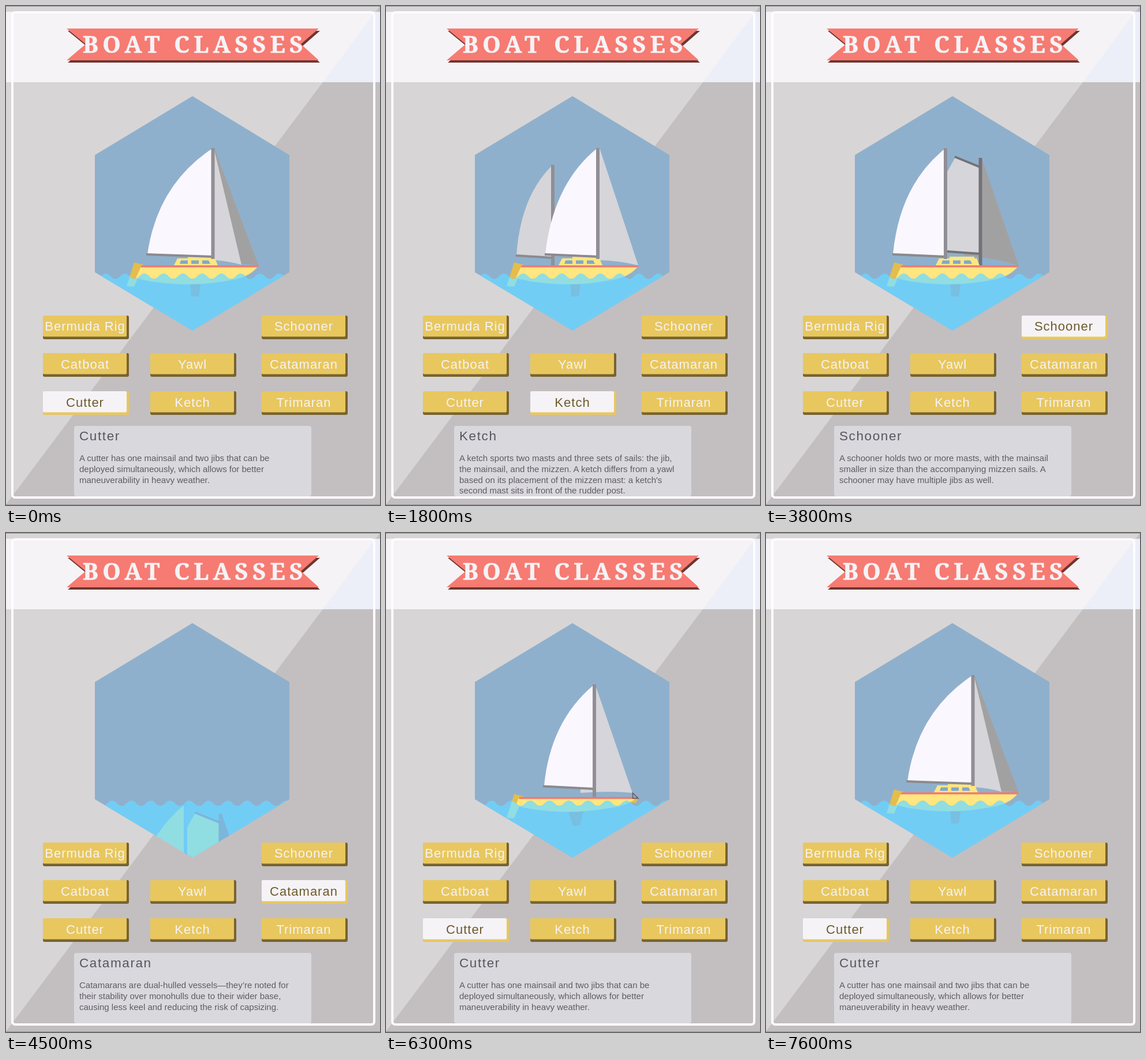
An HTML page for the animation above (7700 ms loop, 648x864 px).

```html
<!DOCTYPE html>
<html lang="en">
<head>
<meta charset="utf-8">
<title>Boat Classes</title>
<style>
  html, body { margin: 0; width: 100%; height: 100%; overflow: hidden; background: #c3bfc0; }
  svg { display: block; width: 648px; height: 864px; font-family: "Liberation Sans", Arial, sans-serif; }
  .title { font: 800 40px "Noto Serif", "Liberation Serif", serif; letter-spacing: 7.3px; fill: #f5f3f6; stroke: #f5f3f6; stroke-width: .7; }
  .btn .face { fill: #e8c75f; }
  .btn .edge { fill: #786330; }
  .btn text { fill: #f5f3f6; font-size: 22px; letter-spacing: 1px; text-anchor: middle; }
  .btn.on .face { fill: #f5f3f6; }
  .btn.on .edge { fill: #e8c75f; }
  .btn.on text { fill: #6e5a2b; }
  #head { font-size: 22.5px; letter-spacing: 1.6px; fill: #58555c; }
  #body { font-size: 15px; fill: #5f5c62; }

  .sail { fill: #fbf7fe; }
  .light { fill: #d6d5d9; }
  .dark { fill: #a2a1a2; }
  .mast { fill: #918f95; }
  .post { fill: #737278; }
  .boom { stroke: #8b8a90; stroke-width: 4; }
  .gaff { stroke: #737278; stroke-width: 4; }
  .hull { fill: #ffe680; }
  .stripe { fill: #ef7b70; }
  .gold { fill: #e3bd4e; }
  .glass { fill: #7fa9cc; }
  .keel { fill: #79bfe1; }
  .rail { fill: none; stroke: #5d5a60; stroke-width: 1.5; }
  /* the same parts seen through the water */
  .wet .sail, .wet .light, .wet .hull, .wet .gold { fill: #90dde2; }
  .wet .dark, .wet .post { fill: #7cb6da; }
  .wet .mast, .wet .glass { fill: #70cbf8; }
  .wet .stripe { fill: #86cfd8; }
  .wet .boom, .wet .gaff, .wet .rail { stroke: #7cb6da; }
</style>
</head>
<body>
<svg viewBox="0 0 648 864">
  <defs>
    <clipPath id="hex"><path d="M323 156L491 258V461L323 562L154 461V258Z"/></clipPath>
    <clipPath id="under"><path class="wave"/></clipPath>
  </defs>
  <rect width="648" height="864" fill="#c3bfc0"/>
  <path d="M0 0H648L0 863Z" fill="#d8d5d6"/>
  <rect y="10" width="648" height="122" fill="#eceef8"/>
  <path d="M0 10H640L549 132H0Z" fill="#f5f3f6"/>
  <path d="M0 .5H648M0 863.5H648" stroke="#92919a"/>

  <path id="ribbon" d="M105 39H542L511 66L542 94H105L138 66Z" fill="#6f3530" transform="translate(2 4)"/>
  <path d="M105 39H542L511 66L542 94H105L138 66Z" fill="#f67b72"/>
  <text class="title" x="133" y="81">BOAT CLASSES</text>

  <g clip-path="url(#hex)">
    <rect x="154" y="156" width="338" height="407" fill="#8fb0cc"/>
    <g class="boat"></g>
    <path class="wave" fill="#72cdf5"/>
    <g clip-path="url(#under)"><g class="boat wet"></g></g>
  </g>

  <g id="buttons"></g>
  <rect x="118" y="727" width="411" height="122" rx="4" fill="#d9d8dd"/>
  <text id="head" x="127" y="752"></text>
  <g id="body"></g>
  <rect x="11" y="11" width="627" height="840" rx="5" fill="none" stroke="#fdfcfe" stroke-width="4"/>
</svg>
<script>
const LOOP = 7700, FRAME = 100, SINK = 570, RISE = 600, DEPTH = 330;

const $$ = s => [...document.querySelectorAll(s)];
const path = (cls, d) => `<path class="${cls}" d="${d}"/>`;
const mast = (x, top, bottom, cls = 'mast') => path(cls, `M${x} ${top}h6V${bottom}h-6Z`);
const rudder = path('gold', 'M222 444L238 448L222 486L209 485Z');

const hull = dx => rudder
  + path('keel', 'M319 478H338L334 503H321Z')
  + `<g transform="translate(${dx})">`
  + path('hull', 'M291 449L297 437H315V434H358V437H362L367 449Z')
  + path('glass', 'M303 440.500h12v6h-14ZM321 440.500h13v6h-13ZM340 440.500h11l3 6h-14Z')
  + '</g>'
  + path('hull', 'M235 449H438Q425 467 398 473Q355 482 315 482Q260 481 225 471Z')
  + path('stripe', 'M235 449H438L436 452.500H233Z');

const boats = {
  Cutter: path('dark', 'M361 246L438 450Q420 446 407 447L361 254Z')
    + path('light', 'M361 250L408 448Q388 442 361 440Z')
    + hull(0)
    + path('sail', 'M357 247Q262 310 245 430L357 433Z')
    + path('boom', 'M243 430L357 434') + mast(355.5, 246, 438),
  Ketch: path('light', 'M370 246L437 449Q405 441 370 440Z')
    + path('light', 'M287 277Q233 330 226 432L287 435Z')
    + path('boom', 'M225 432L289 436') + mast(286, 275, 449)
    + hull(8)
    + path('sail', 'M365 247Q290 308 276 429L365 432Z')
    + path('boom', 'M275 430L366 434') + mast(364, 246, 438),
  Schooner: path('dark', 'M374 264L438 450Q400 436 342 432Z')
    + path('light', 'M328 262L370 279V429L314 425V287Z')
    + path('gaff', 'M327 261L371 279M314 425L370 429') + mast(368.5, 263, 449, 'post')
    + hull(3)
    + path('sail', 'M309 248Q232 310 220 429L309 433Z')
    + path('boom', 'M219 430L310 434') + mast(308, 246, 438),
  Catamaran: path('light', 'M363 256L427 442Q390 438 337 442V435H363Z')
    + path('sail', 'M359 256Q285 318 274 429L359 434Z')
    + path('boom', 'M272 430.500L360 435') + mast(358, 254, 449)
    + rudder
    + path('keel', 'M315 472H343L336 497Q334 499 324 499Z')
    + path('gold', 'M420 450H438L433 459H420Z')
    + path('hull', 'M230 450H435Q420 463 395 467Q350 475 315 475Q260 474 225 464Z')
    + path('stripe', 'M231 449H438L435 452.500H230Z')
    + path('rail', 'M427.500 452V442L437 451.500H427')
};

const info = {
  Cutter: ['A cutter has one mainsail and two jibs that can be',
    'deployed simultaneously, which allows for better',
    'maneuverability in heavy weather.'],
  Ketch: ['A ketch sports two masts and three sets of sails: the jib,',
    'the mainsail, and the mizzen. A ketch differs from a yawl',
    'based on its placement of the mizzen mast: a ketch\'s',
    'second mast sits in front of the rudder post.'],
  Schooner: ['A schooner holds two or more masts, with the mainsail',
    'smaller in size than the accompanying mizzen sails. A',
    'schooner may have multiple jibs as well.'],
  Catamaran: ['Catamarans are dual-hulled vessels—they’re noted for',
    'their stability over monohulls due to their wider base,',
    'causing less keel and reducing the risk of capsizing.']
};

const picks = [[200, 'Ketch'], [1900, 'Schooner'], [4000, 'Catamaran'], [6135, 'Cutter']];

const columns = [
  [64, ['Bermuda Rig', 'Catboat', 'Cutter']],
  [250, ['', 'Yawl', 'Ketch']],
  [443, ['Schooner', 'Catamaran', 'Trimaran']]
];
const rows = [536, 601, 667];
buttons.innerHTML = columns.map(([x, names]) => names.map((name, i) => name && `
  <g class="btn" data-name="${name}" transform="translate(${x} ${rows[i]})">
    <path class="edge" d="M0 3H145V0H146Q149 0 149 3V38Q149 41 146 41H3Q0 41 0 38Z"/>
    <rect class="face" width="145" height="36.500" rx="2"/>
    <text x="73" y="${i ? 27 : 26}">${name}</text>
  </g>`).join('')).join('');

$$('.wave').forEach(w => w.setAttribute('d',
  'M108.800 468q8.350 -9 16.700 0' + 't16.700 0'.repeat(25) + 'V570H108.800Z'));

let chosen, afloat;

function select(name) {
  if (name === chosen) return;
  chosen = name;
  $$('.btn').forEach(b => b.classList.toggle('on', b.dataset.name === name));
  head.textContent = name;
  body.innerHTML = info[name].map((line, i) =>
    `<text x="127" y="${788 + 18.8 * i}">${line}</text>`).join('');
}

function float(name, y) {
  $$('.boat').forEach(g => {
    if (name !== afloat) g.innerHTML = boats[name];
    g.setAttribute('transform', `translate(0 ${y})`);
  });
  afloat = name;
}

const body = document.getElementById('body'), head = document.getElementById('head');

function draw(now) {
  const t = Math.floor(now % LOOP / FRAME) * FRAME;
  const n = picks.length;
  const i = (picks.filter(p => p[0] <= t).length + n - 1) % n;
  const [start, name] = picks[i];
  const age = (t - start + LOOP) % LOOP;

  select(name);
  if (age < SINK) float(picks[(i + n - 1) % n][1], DEPTH * (age / SINK) ** 3);
  else float(name, DEPTH * (1 - Math.min(1, (age - SINK) / RISE)) ** 3);

  const sway = 7 * Math.cos((t - 2600) / LOOP * 8 * Math.PI) - 7;
  $$('.wave').forEach(w => w.setAttribute('transform', `translate(${sway})`));
  requestAnimationFrame(() => draw(performance.now()));
}
draw(performance.now());
</script>
</body>
</html>
```
